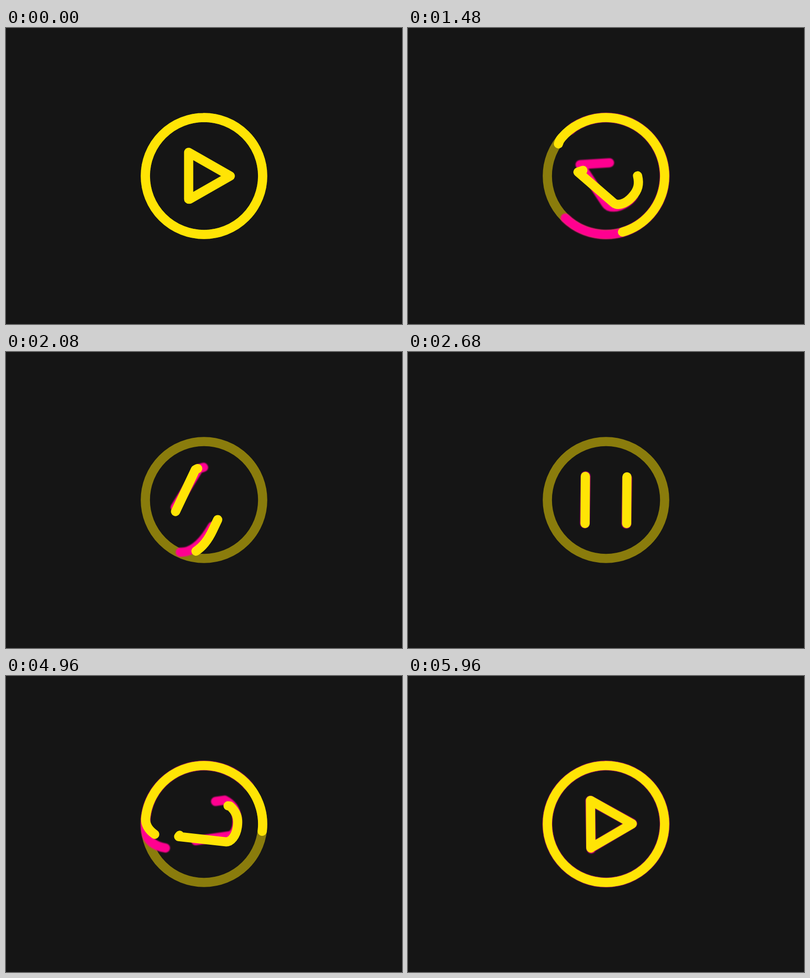
Animation of 800x600 px, one loop 7.12 s. Source, as an HTML page:

```html
<!DOCTYPE html>
<html lang="en">
<head>
<meta charset="utf-8">
<title>Play and pause</title>
<style>
  html, body { margin: 0; width: 100%; height: 100%; overflow: hidden; background: #151515; }
  svg { display: block; width: 100vw; height: 100vh; }
  path, circle { fill: none; stroke: #ffe405; stroke-width: 18.6; stroke-linecap: round; stroke-linejoin: round; }
  .base { opacity: .5; }
  .trail path { stroke: #ff0090; }
</style>
</head>
<body>
<svg viewBox="0 0 800 600">
  <defs>
    <filter id="soft" filterUnits="userSpaceOnUse" x="250" y="150" width="300" height="300">
      <feGaussianBlur stdDeviation="1.3"/>
    </filter>
  </defs>
  <circle class="base" cx="400" cy="300" r="118.5"/>
  <g class="trail" filter="url(#soft)"><g class="spin"></g></g>
  <g class="main"><g class="spin"></g></g>
</svg>
<script>
const LOOP = 7120, STEP = 40, LAG = 64, BAR = 96;
const TO_PAUSE = 1176, TO_PLAY = 4462;

// Each strand runs along its icon outline, through a bend, into a pause bar.
const strands = [
  {
    d: 'M400 181.5 A118.5 118.5 0 0 0 400 418.5 A118.5 118.5 0 0 0 400 181.5 ' +
       'C376 181.5 358 208 358 252 V348',
    outline: 2 * Math.PI * 118.5,
    tail: { out: 1320, back: 1543 },
    head: { out: 1600, back: 1030, slow: true }
  },
  {
    d: 'M371 347 L453 300 L369 252 V347 C369 358 383 367 402 367.5 S432 362 442 348 V252',
    outline: Math.hypot(82, 47) + Math.hypot(84, 48) + 95,
    tail: { out: 1070, back: 1700 },
    head: { out: 1070, back: 1700 }
  }
];
const turn = { out: 1600, back: 1600 };

function bezier(x1, y1, x2, y2) {
  const at = (a, b, s) => 3 * a * s * (1 - s) ** 2 + 3 * b * s * s * (1 - s) + s ** 3;
  return x => {
    if (x <= 0) return 0;
    if (x >= 1) return 1;
    let lo = 0, hi = 1;
    for (let i = 0; i < 24; i++) {
      const mid = (lo + hi) / 2;
      if (at(x1, x2, mid) < x) lo = mid; else hi = mid;
    }
    return at(y1, y2, lo);
  };
}
const ease = bezier(.25, .1, .25, 1);
const easeInOut = bezier(.42, 0, .58, 1);

// 0 is play, 1 is pause
function progress(t, { out, back, slow }) {
  if (t >= TO_PLAY) return 1 - ease((t - TO_PLAY) / back);
  return (slow ? easeInOut : ease)((t - TO_PAUSE) / out);
}

function makeLayer(name) {
  const root = document.querySelector('.' + name);
  const spin = root.querySelector('.spin');
  const paths = strands.map(({ d }) => {
    const path = document.createElementNS('http://www.w3.org/2000/svg', 'path');
    path.setAttribute('d', d);
    return spin.appendChild(path);
  });
  return { root, spin, paths };
}
const trail = makeLayer('trail');
const main = makeLayer('main');

function draw({ spin, paths }, t) {
  spin.setAttribute('transform', `rotate(${-180 * progress(t, turn)} 400 300)`);
  strands.forEach((strand, i) => {
    const total = paths[i].getTotalLength();
    const tail = (total - BAR) * progress(t, strand.tail);
    const head = strand.outline + (total - strand.outline) * progress(t, strand.head);
    paths[i].setAttribute('stroke-dasharray', `${head - tail} 3000`);
    paths[i].setAttribute('stroke-dashoffset', -tail);
  });
}

const start = performance.now();
function frame() {
  const t = Math.floor(((performance.now() - start) % LOOP) / STEP) * STEP;
  trail.root.setAttribute('visibility', t < STEP ? 'hidden' : 'visible');
  draw(trail, t - LAG);
  draw(main, t);
  requestAnimationFrame(frame);
}
frame();
</script>
</body>
</html>
```
